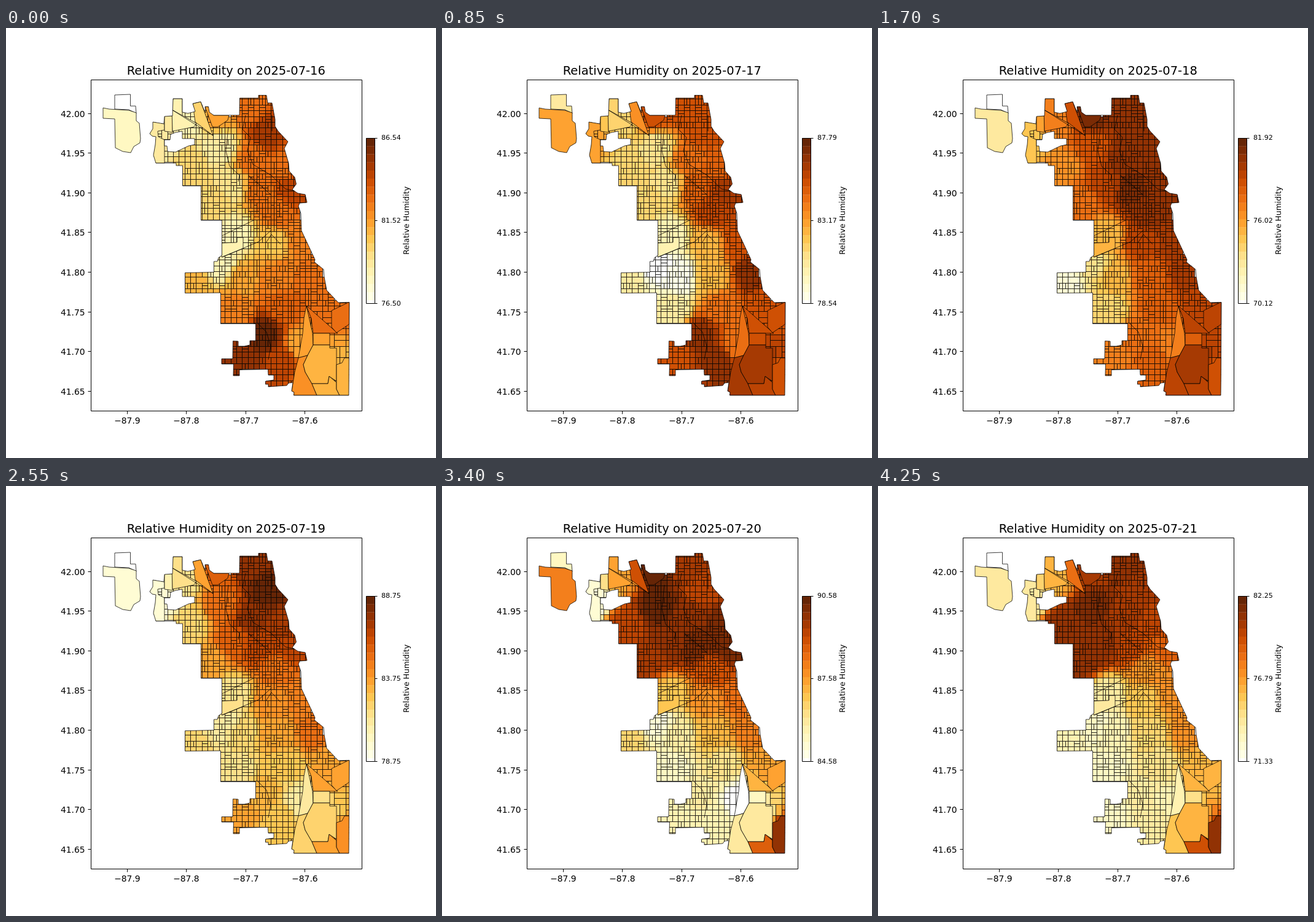
Recreate the animation shown at these times as an HTML page. Size 700x700 px, loop 5100 ms.

```html
<!DOCTYPE html>
<html lang="en">
<head>
<meta charset="utf-8">
<title>Relative Humidity</title>
<style>
html, body { margin: 0; width: 100%; height: 100%; overflow: hidden; background: #fff; }
svg { display: block; width: 700px; height: 700px; }
text { font-family: "DejaVu Sans", sans-serif; font-size: 13.89px; fill: #000; }
.title { font-size: 19.5px; text-anchor: middle; }
.x { text-anchor: middle; }
.y { text-anchor: end; }
.scale { font-size: 11.11px; }
.name { font-size: 12.5px; text-anchor: middle; }
.line { fill: none; stroke: #000; stroke-width: .75; stroke-linejoin: round; }
.axis { fill: none; stroke: #000; stroke-width: 1; }
</style>
</head>
<body>
<svg id="stage" viewBox="0 0 700 700"></svg>
<script>
const svg = document.getElementById('stage');
const STEP = 850, MILE = 18.7;

function add(tag, attrs, parent = svg, text) {
  const el = document.createElementNS('http://www.w3.org/2000/svg', tag);
  for (const k in attrs) el.setAttribute(k, attrs[k]);
  if (text !== undefined) el.textContent = text;
  return parent.appendChild(el);
}

let seed = 20;
function random() {
  seed = (seed * 1664525 + 1013904223) % 4294967296;
  return seed / 4294967296;
}

// Colour scale: white, then 20 steps from cream to dark brown
const ramp = ['ffffe5', 'fff7bc', 'fee391', 'fec44f', 'fe9929', 'ec7014', 'cc4c02', '993404', '662506']
  .map(h => [0, 2, 4].map(i => parseInt(h.slice(i, i + 2), 16)));

function colour(level) {
  if (level < 1) return '#fff';
  const t = (level - 1) / 19 * 8, i = Math.min(7, Math.floor(t));
  return `rgb(${ramp[i].map((c, k) => Math.round(c + (ramp[i + 1][k] - c) * (t - i)))})`;
}

// Key points of the weather field, from north to south
const keys = [
  195,118, 195,168, 248,185, 295,145, 345,140, 395,130, 425,170,
  300,225, 350,195, 400,215, 455,225,
  335,285, 370,255, 410,260, 465,262, 440,300,
  370,340, 430,350, 485,345, 350,385, 303,415, 385,405, 440,405, 505,400,
  375,460, 455,455, 530,450,
  420,500, 380,530, 450,540, 480,515, 515,545, 550,570];

// One day each: lowest and highest value, then a colour level per key point
const days = [
  { low: 76.50, high: 86.54, levels: [0,3,5,4,10,13,17, 7,5,13,13, 7,6,13,16,13, 4,8,12,4,9,10,12,13, 12,14,13, 20,18,16,10,9,9] },
  { low: 78.54, high: 87.79, levels: [5,10,10,7,15,15,15, 7,6,13,14, 7,6,14,17,16, 4,9,15,0,5,1,9,18, 5,13,15, 18,15,18,13,17,15] },
  { low: 70.12, high: 81.92, levels: [0,5,8,12,19,18,18, 11,15,18,18, 13,16,19,18,18, 9,16,17,6,2,9,14,17, 7,14,16, 13,12,14,12,17,15] },
  { low: 78.75, high: 88.75, levels: [0,2,2,6,14,18,20, 7,13,18,17, 10,14,16,16,13, 6,11,12,5,7,7,10,13, 6,8,10, 9,10,8,5,7,11] },
  { low: 84.58, high: 90.58, levels: [3,12,2,10,20,17,16, 16,20,18,19, 17,18,19,19,15, 8,11,13,2,7,5,9,12, 3,6,10, 5,4,4,0,5,18] },
  { low: 71.33, high: 82.25, levels: [0,5,5,9,17,18,17, 18,19,17,16, 18,18,16,14,11, 5,8,11,3,4,4,7,11, 3,6,9, 5,3,5,4,9,18] }
];

// Inverse-distance weighting of the key points
function fieldColours(x, y) {
  const weights = days[0].levels.map((_, i) =>
    ((keys[2 * i] - x) ** 2 + (keys[2 * i + 1] - y) ** 2 + 1) ** -2.5);
  const total = weights.reduce((a, b) => a + b);
  return days.map(({ levels }) =>
    colour(Math.round(levels.reduce((s, v, i) => s + v * weights[i], 0) / total)));
}

// City border in three runs
const shore = 'M380.5,114 H411 V109.5 H424 L426,122 433,122 438,149 438,160 443,168 459,185 453,196 460,220 461,233 ' +
  '470,243 472.5,254 466,263 475,269 487,271 490,284 478,285 476,290 480,302 481,330 503,377 502,381 517,393 ' +
  '518,405 522,427 541,447 559,446.5 ';
const base = 'L558,598 468.5,598 469,593 465,591 467,577 460,578 457,582 427,584 427,580 422.5,580 422.5,575 436,573 ' +
  'V565 H427 L426.5,555.5 380,556.5 V566 H370 L370.5,547 H351 V538.5 H369 L369.5,509.5 378,510 378,518 388,518 ' +
  '397,516 397,509 406.5,509 V481.5 H349.5 V431 L291.5,431.5 V398.5 L338.5,397.5 V380 H344 L346,374 351.5,370 V313 ';
const west = 'H317.5 V257 H287.5 V224 H277 V220 H244 L240,207 243,190 244,177 238,176 234,172 239,164 239,153 ' +
  '257,156 258,144 271,143 272,115 287,115 287,137 296,139 308,136 304,123 317,120 321,130 325,138 324,128 ' +
  '329.5,128 331,137 338,142 380,142Z M287,168 V180 H307 V190 L297,192 276,202 263,201 262,192 258,192 258,182 ' +
  '267,182 268,173 276,170Z';
const cityPath = shore + base + west;

add('rect', { width: 700, height: 700, fill: '#fff' });
const clip = add('clipPath', { id: 'city' }, add('defs', {}));
add('path', { d: cityPath, 'clip-rule': 'evenodd' }, clip);
const airport = add('g', { class: 'line' });
const map = add('g', { class: 'line', 'clip-path': 'url(#city)' });
const border = add('path', { class: 'line', d: cityPath, 'fill-rule': 'evenodd' });

const cells = [];

function patch(points, parent = map) {
  const el = add('polygon', { points }, parent), box = el.getBBox();
  cells.push({ el, fills: fieldColours(box.x + box.width / 2, box.y + box.height / 2) });
}

const snap = v => Math.floor(v) + .5;
function block(x, y, w, h) {
  const a = snap(x), b = snap(y);
  const el = add('rect', { x: a, y: b, width: snap(x + w) - a, height: snap(y + h) - b }, map);
  cells.push({ el, fills: fieldColours(x + w / 2, y + h / 2) });
}

// Typical tract area by district
function tractArea(x, y) {
  if (x > 467 && y > 450) return 200;
  if (y > 480 || x < 310) return 115;
  return x > 385 && x < 442 && y > 235 && y < 330 ? 55 : 90;
}

// Halve a block along its longer side until it is small enough
function split(x, y, w, h) {
  if (w * h < tractArea(x, y) * (.6 + random())) return block(x, y, w, h);
  if (w > h || (w === h && random() < .6)) {
    split(x, y, w / 2, h);
    split(x + w / 2, y, w / 2, h);
  } else {
    split(x, y, w, h / 2);
    split(x, y + h / 2, w, h / 2);
  }
}

function inCity(x, y) {
  for (let i = 0; i < 16; i++) {
    const p = svg.createSVGPoint();
    p.x = x + (i % 4 + .5) * MILE / 4;
    p.y = y + (Math.floor(i / 4) + .5) * MILE / 4;
    if (border.isPointInFill(p)) return true;
  }
  return false;
}

// One-mile street grid
for (let row = -20; row < 7; row++) for (let col = -10; col < 9; col++) {
  const x = 403.4 + col * MILE, y = 480.6 + row * MILE;
  if (inCity(x, y)) split(x, y, MILE, MILE);
}

patch('177,109 202.5,108 202.5,127 211,127 212,139 200,133 177,132', airport);
patch('158,130 168,132 200,134 212,138 212,151 217,155 219,180 218,187 208,193 203,203 190,201 178,195 177,148 158,147', airport);

// Large tracts off the street grid
[
  '234,150 258,156 258,166 247,168 248,177 258,182 258,220 234,220',
  '258,143 271,143 271,170 258,168',
  '272,115 287,115 287,144 270,133',
  '270,133 310,155 306,161 271,168',
  '304,123 317,120 337,175 308,153',
  '324,128 330,128 338,142 363,142 361,150 345,161 336,161',
  '351,350 376,349 376,341 386,341 386,359 351,373',
  '489,452 499,497 500,516 491,533 476,537 483,497 485,472',
  '476,537 491,533 484,548 487,560 498,579 506,598 466,598 465,591 470,560',
  '489,452 540,497 500,497 497,473',
  '530,460 559,446 559,482 538,496 530,487',
  '500,497 527,497 527,516 500,516',
  '500,516 527,516 527,521 538,521 538,575 526,567 524,579 498,579 487,560 484,548 491,533',
  '498,579 524,579 526,567 538,577 538,588 543,598 506,598',
  '538,548 547,545 551,537 559,537 559,598 543,598 538,588'
].forEach(p => patch(p));

// Rivers, rail lines and diagonal streets
add('path', {
  fill: 'none',
  d: 'M270,133 L337,175 M362,161 L358,200 364,225 380,240 378,250 M390,142 L385,165 398,178 393,200 402,222 432,240 ' +
    '455,262 470,265 M395,240 L432,272 M352,373 L411,348 432,329 M352,338 L403,313 M423,350 L432,336 447,352 ' +
    'M433,142 V168 M410,481 L424,495 431,518 427,540'
}, map);

// Axes
let ticks = 'M138.5,84.5 H579.5 V623.5 H138.5Z ';
for (let i = 0; i < 8; i++) {
  const y = 139 + i * 64.6;
  ticks += `M133.5,${snap(y)} H138.5 `;
  add('text', { class: 'y', x: 128.7, y: Math.floor(y + 6) }, svg, (42 - i * .05).toFixed(2));
}
for (let i = 0; i < 4; i++) {
  const x = Math.round(197 + i * 96.4);
  ticks += `M${x + .5},623.5 V628.5 `;
  add('text', { class: 'x', x: x + .4, y: 644 }, svg, '−' + (87.9 - i * .1).toFixed(1));
}

// Colour bar
for (let i = 1; i <= 20; i++)
  add('rect', { x: 586.5, y: 443 - i * 13.2, width: 14, height: 13.4, fill: colour(i) });
ticks += 'M586.5,179.5 H600.5 V448.5 H586.5Z M600.5,179.5 h4 M600.5,313.5 h4 M600.5,448.5 h4';
add('path', { class: 'axis', d: ticks });
add('text', { class: 'name', transform: 'translate(656 313.5) rotate(-90)' }, svg, 'Relative Humidity');
const scale = [182, 317, 452].map(y => add('text', { class: 'scale', x: 611, y }));
const title = add('text', { class: 'title', x: 358.3, y: 76 });

let shown = -1;
function draw() {
  const i = Math.floor(performance.now() / STEP) % days.length;
  if (i !== shown) {
    shown = i;
    const { low, high } = days[i];
    title.textContent = `Relative Humidity on 2025-07-${16 + i}`;
    [high, (low + high) / 2, low].forEach((v, k) => scale[k].textContent = v.toFixed(2));
    for (const c of cells) c.el.setAttribute('fill', c.fills[i]);
  }
  requestAnimationFrame(draw);
}
draw();
</script>
</body>
</html>
```
